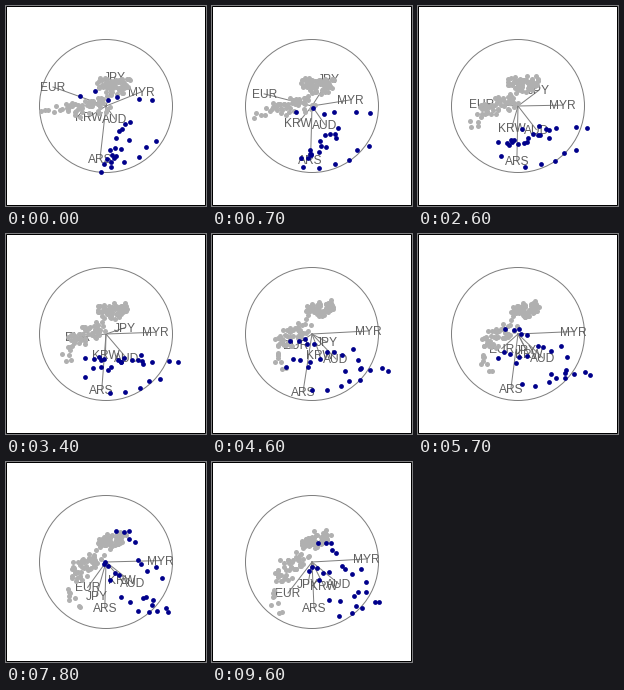
Animation of 200 by 200 pixels, one loop 9.8 s. Source, as a matplotlib script:

```python
"""Tour of six exchange-rate series: a rotating 2-D projection of 6-D data."""
import numpy as np
import matplotlib.pyplot as plt
from matplotlib.animation import FuncAnimation
from matplotlib.patches import Circle, Rectangle

TICK = 100        # ms
TICKS = 98
STEPS = 38        # projections shown in one loop
MID = 100.0       # stage centre, px
RADIUS = 66.5
PX = 0.72         # points per pixel at 100 dpi
GREY, DARK = "#7f7f7f", "#606060"

# Key projections: axis tips in pixels from the centre.
NAMES = ["EUR", "JPY", "MYR", "KRW", "AUD", "ARS"]
KEY_STEPS = [0, 7, 21, 32, 37]
KEY_X = np.array([[-53, 9, 35, -17, 9, -6],
                  [-44, 23, 40, -12, 16, 2],
                  [-16, 15, 56, 8, 24, -9],
                  [-17, -11, 54, 17, 27, -2],
                  [-24, -4, 54, 12, 27, 2]])
KEY_Y = np.array([[-19, -29, -14, 11, 13, 53],
                  [-7, -25, 0, 22, 23, 54],
                  [11, 8, -3, 21, 25, 58],
                  [24, 37, -1, 17, 21, 46],
                  [31, 22, -3, 24, 22, 46]])

# Each step lasts two ticks, apart from these.
hold = np.full(STEPS, 2)
hold[[0, 24]] = 1
hold[[10, 21]] = 3
hold[[8, 9, 30, 32, 33, 35]] = 4
hold[23], hold[36] = 6, 8
STARTS = np.cumsum(hold) - hold


def tips_at(step):
    return np.array([[np.interp(step, KEY_STEPS, col) for col in key.T]
                     for key in (KEY_X, KEY_Y)])


VIEWS = np.vstack([tips_at(s) / RADIUS for s in (0, 15, 33)])
rng = np.random.default_rng(8)


def strand(n, spread, *views):
    """n points along a 6-D segment, given by its ends (x0, y0, x1, y1)
    as seen in the three VIEWS."""
    ends = np.vstack([np.reshape(v, (2, 2)).T for v in views]) - MID
    ends = np.linalg.solve(VIEWS.T @ VIEWS + 0.01 * np.eye(6), VIEWS.T @ ends)
    u = np.linspace(0, 1, n)
    line = np.outer(ends[:, 0], 1 - u) + np.outer(ends[:, 1], u)
    return line + rng.normal(scale=spread, size=line.shape)


old = np.hstack([
    strand(62, 4.2, (93, 82, 120, 77), (94, 77, 122, 79), (94, 83, 114, 74)),
    strand(48, 4.5, (104, 97, 64, 103), (97, 93, 62, 105), (90, 93, 70, 115)),
    strand(8, 2, (62, 104, 38, 108), (64, 108, 48, 120), (62, 128, 78, 152)),
])
recent = np.hstack([
    strand(5, 2, (103, 162, 104, 144), (82, 126, 100, 127), (115, 64, 128, 81)),
    strand(6, 3, (97, 160, 121, 130), (79, 138, 117, 129), (94, 98, 110, 112)),
    strand(5, 3, (118, 128, 122, 118), (116, 127, 138, 129),
           (136, 97, 158, 118)),
    strand(5, 2, (108, 162, 150, 137), (106, 159, 160, 147),
           (120, 137, 147, 135)),
    strand(6, 3, (75, 90, 141, 95), (116, 133, 170, 127), (138, 152, 162, 145)),
])

fig = plt.figure(figsize=(2, 2), dpi=100, facecolor="white")
ax = fig.add_axes([0, 0, 1, 1])
ax.set(xlim=(0, 200), ylim=(200, 0))
ax.axis("off")
ax.add_patch(Rectangle((0.5, 0.5), 199, 199, fill=False, ec="black", lw=PX,
                       snap=False))
ax.add_patch(Circle((MID, MID), RADIUS, fill=False, ec=GREY, lw=PX))

lines = [ax.plot([], [], color=GREY, lw=PX, zorder=2)[0] for _ in NAMES]
labels = [ax.text(0, 0, name, family="Liberation Sans", size=12 * PX,
                  color=DARK, ha="center", va="baseline", zorder=3)
          for name in NAMES]


def dots(color, size, z):
    return ax.plot([], [], "o", color=color, ms=size * PX, mew=0, zorder=z)[0]


old_dots = dots("#b0b0b0", 5, 4)
recent_dots = dots("#00008b", 4.8, 5)


def draw(tick):
    step = np.searchsorted(STARTS, tick, side="right") - 1
    tips = tips_at(step)
    for line, label, (x, y) in zip(lines, labels, MID + tips.T):
        line.set_data([MID, x], [MID, y])
        label.set_position((x, y + 4))
    for artist, data in ((old_dots, old), (recent_dots, recent)):
        artist.set_data(*(MID + tips / RADIUS @ data))
    return [*lines, *labels, old_dots, recent_dots]


anim = FuncAnimation(fig, draw, frames=TICKS, interval=TICK, repeat=True,
                     repeat_delay=0)
plt.show()
```
